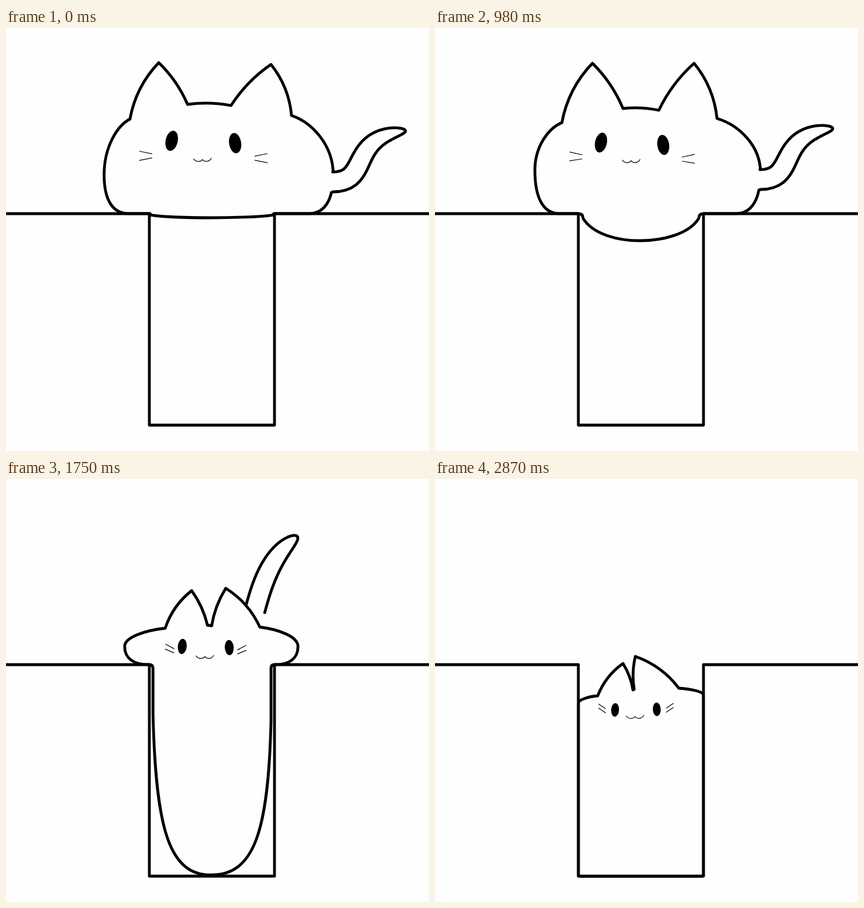
An HTML page with a canvas for the animation above (3080 ms loop, 720x720 px).

```html
<!DOCTYPE html>
<html lang="en">
<head>
<meta charset="utf-8">
<title>Cat sinking into a pit</title>
<style>
html, body { margin: 0; width: 100%; height: 100%; overflow: hidden; background: #fefefe; }
canvas { display: block; width: 100vw; height: 100vh; }
</style>
</head>
<body>
<canvas id="stage" width="720" height="720"></canvas>
<script>
const ctx = document.getElementById('stage').getContext('2d');
const LOOP = 3080, STEP = 70, LAST = 2870, TAIL_LIFTS = 1190;
const PAPER = '#fefefe', INK = '#000';
const FLOOR = 316, PIT = { left: 244, right: 457, bottom: 676, middle: 349 };

// Tail spines: cubic curves relative to the widest point of the right flank
const lying = [-1, 12, 65, 12, 23, -64, 123, -75];
const raised = [-73, -62, -61, -107, -45, -157, -1, -187];
const hidden = [-38, 70, -38, 60, -38, 50, -38, 40];

// ears: base, tip, inner base, then the same mirrored
// body: widest point on the left, on the right, lowest y
const resting = {
  t: 0, ease: 2.6, tail: lying,
  ears: [211, 155, 260, 59, 309, 130, 383, 132, 451, 62, 486, 149],
  body: [167, 250, 557, 250, 323],
  eyes: [282, 192, 390, 196],
};
const sagging = {
  t: 980, ease: 1, tail: lying,
  ears: [216, 161, 268, 60, 320, 137, 381, 140, 441, 60, 480, 154],
  body: [170, 242, 554, 246, 362],
  eyes: [282.5, 195, 388.5, 199],
};
const slipping = { ...sagging, t: 1120, body: [...sagging.body.slice(0, 4), 389] };
const pouring = {
  t: 1540, ease: 1, tail: raised,
  ears: [265, 205, 318, 136, 345, 201, 355, 202, 381, 134, 447, 208],
  body: [190, 272, 535, 272, 544],
  eyes: [296, 236, 379, 237.5],
};
const landing = {
  t: 1750, ease: 1, tail: raised,
  ears: [271, 254, 316, 190, 343, 249, 350, 250, 374, 186, 432, 252],
  body: [202, 285, 497, 285, 674],
  eyes: [300, 285, 380, 287],
};
const filling = {
  t: 2030, ease: 1, tail: hidden,
  ears: [279, 320, 311, 259, 340, 313, 343, 313, 364, 253, 413, 307],
  body: [246, 342, 455, 334, 675],
  eyes: [305, 351, 382, 352],
};
const settling = {
  t: 2310, ease: 1, tail: hidden,
  ears: [274, 363, 311, 307, 335, 356, 340, 355, 351, 296, 412, 349],
  body: [245, 380, 455, 372, 678],
  eyes: [306.5, 388, 377.5, 387],
};
const still = {
  t: LAST, ease: 1, tail: hidden,
  ears: [277, 369, 320, 314, 337, 359, 339, 358, 341, 302, 415, 356],
  body: [244, 382, 457, 368, 678],
  eyes: [306.5, 393, 377.5, 392],
};
const poses = [resting, sagging, slipping, pouring, landing, filling, settling, still];

const lerp = (a, b, u) => a + (b - a) * u;
const clamp = v => Math.max(0, Math.min(1, v));

function poseAt(t) {
  const next = Math.max(1, poses.findIndex(p => p.t >= t));
  const a = poses[next - 1], b = poses[next];
  const u = ((t - a.t) / (b.t - a.t)) ** a.ease;
  const mix = part => a[part].map((v, i) => lerp(v, b[part][i], u));
  return { ears: mix('ears'), body: mix('body'), eyes: mix('eyes'), tail: mix('tail') };
}

// Shallow arc; bow is its height relative to the chord
function arc(path, x1, y1, x2, y2, bow) {
  const k = 2 * bow;
  path.quadraticCurveTo((x1 + x2) / 2 + (y2 - y1) * k, (y1 + y2) / 2 - (x2 - x1) * k, x2, y2);
}

// Ear base, widest point, foot on the floor, rim of the pit, bottom of the belly
function addSide(path, [bx, by], [wx, wy], bottom, dir) {
  const rim = dir > 0 ? PIT.right : PIT.left;
  const overhang = Math.max(0, (wx - rim) * dir);
  const full = clamp(1 - overhang / 54);
  const floor = Math.max(FLOOR, wy);
  const edge = overhang > 0 ? rim : wx;
  const foot = edge + dir * Math.max(0, overhang - 42);

  path.bezierCurveTo(lerp(bx, wx, .5), lerp(by, wy, .12), wx, lerp(by, wy, .5), wx, wy);
  path.bezierCurveTo(wx, lerp(wy, floor, .65), lerp(foot, wx, .65), floor, foot, floor);
  path.lineTo(edge, floor);

  const depth = bottom - floor, steep = Math.min(1, depth / 228);
  const round = Math.min(8, depth / 3) * (1 - full);
  const x = edge - dir * round;
  const drop = lerp(depth - round, 4, full);
  const inset = (20 - 14 * steep) * (1 - full);
  const spread = lerp(30 + 32 * steep, Math.abs(x - PIT.middle), full);
  path.quadraticCurveTo(x, floor, x, floor + round);
  path.lineTo(x, bottom - drop);
  path.bezierCurveTo(x - dir * inset, bottom - .27 * drop,
    PIT.middle + dir * spread, bottom, PIT.middle, bottom);
}

function paint(path) {
  ctx.fillStyle = PAPER;
  ctx.fill(path);
  ctx.lineWidth = 4.8;
  ctx.stroke(path);
}

function drawBody({ ears, body }) {
  const [lx, ly, rx, ry, bottom] = body;
  const leftBase = ears.slice(0, 2), rightBase = ears.slice(10);
  const path = new Path2D();
  path.moveTo(...leftBase);
  [.075, .05, .04, .05, .075].forEach((bow, i) => arc(path, ...ears.slice(2 * i, 2 * i + 4), bow));
  addSide(path, rightBase, [rx, ry], bottom, 1);
  path.moveTo(...leftBase);
  addSide(path, leftBase, [lx, ly], bottom, -1);
  paint(path);
}

function drawTail({ tail, body }, inFront) {
  const [x0, y0, x1, y1, x2, y2, x3, y3] = tail.map((v, i) => v + body[2 + i % 2]);
  const bezier = (a, b, c, d, u, v = 1 - u) => a * v ** 3 + 3 * b * v * v * u + 3 * c * v * u * u + d * u ** 3;
  const slope = (a, b, c, d, u, v = 1 - u) => (b - a) * v * v + 2 * (c - b) * v * u + (d - c) * u * u;
  const near = [], far = [], n = 30;
  for (let i = 0; i <= n; i++) {
    const u = Math.sin(i / n * Math.PI / 2);
    const x = bezier(x0, x1, x2, x3, u), y = bezier(y0, y1, y2, y3, u);
    const dx = slope(x0, x1, x2, x3, u), dy = slope(y0, y1, y2, y3, u);
    const k = 17 * Math.sqrt(Math.max(0, 1 - u ** 4)) / (Math.hypot(dx, dy) || 1);
    near.push([x + dy * k, y - dx * k]);
    far.unshift([x - dy * k, y + dx * k]);
  }
  if (inFront) {
    // Open the flank where the tail joins it
    ctx.fillStyle = PAPER;
    ctx.fillRect(x0 - 5, y0 - 15, 10, 31);
  }
  const path = new Path2D();
  [...near, ...far].forEach(p => path.lineTo(...p));
  paint(path);
}

// Size, mouth and whiskers all follow from the distance between the eyes
function drawFace({ eyes }) {
  const [lx, ly, rx, ry] = eyes;
  const gap = rx - lx;
  const tilt = .22 * (gap - 60) / 48;
  ctx.fillStyle = INK;
  for (const [x, y, angle] of [[lx, ly, tilt], [rx, ry, -tilt * .7]]) {
    ctx.beginPath();
    ctx.ellipse(x, y, gap * .095, gap * .162, angle, 0, Math.PI * 2);
    ctx.fill();
  }

  ctx.lineWidth = 1.2;
  ctx.beginPath();
  const mx = (lx + rx) / 2 - 1.5, my = (ly + ry) / 2 + (gap - 48) * .49, w = 15;
  ctx.moveTo(mx - w, my - .5);
  ctx.bezierCurveTo(mx - w * .75, my + 5, mx - w * .2, my + 5, mx, my + .5);
  ctx.bezierCurveTo(mx + w * .2, my + 5, mx + w * .75, my + 5, mx + w, my - 1.5);

  const lift = (108 - gap) * .016, fan = .2 * (gap - 71) / 37, length = gap * .2;
  for (const [ex, ey, dir] of [[lx, ly, -1], [rx, ry, 1]]) {
    for (const row of [0, 1]) {
      const x = ex + dir * (12 + .7 * Math.abs(gap - 77));
      const y = ey + (gap - 71) * .65 - 2 + row * 7;
      const angle = lift + (row ? -fan : fan);
      ctx.moveTo(x, y);
      ctx.lineTo(x + dir * length * Math.cos(angle), y - length * Math.sin(angle));
    }
  }
  ctx.stroke();
}

const room = new Path2D();
room.rect(0, 0, 720, FLOOR + 2.4);
room.rect(PIT.left - 2.4, FLOOR, PIT.right - PIT.left + 4.8, PIT.bottom - FLOOR + 2.4);

const ground = new Path2D();
ground.moveTo(-5, FLOOR);
ground.lineTo(PIT.left, FLOOR);
ground.lineTo(PIT.left, PIT.bottom);
ground.lineTo(PIT.right, PIT.bottom);
ground.lineTo(PIT.right, FLOOR);
ground.lineTo(725, FLOOR);

function draw(t) {
  const pose = poseAt(t), tailInFront = t < TAIL_LIFTS;
  ctx.fillStyle = PAPER;
  ctx.fillRect(0, 0, 720, 720);
  ctx.strokeStyle = INK;
  ctx.lineCap = ctx.lineJoin = 'round';
  ctx.save();
  ctx.clip(room);
  if (!tailInFront) drawTail(pose, false);
  drawBody(pose);
  if (tailInFront) drawTail(pose, true);
  drawFace(pose);
  ctx.restore();
  ctx.lineWidth = 4.8;
  ctx.stroke(ground);
}

const start = performance.now();
function tick() {
  const t = (performance.now() - start) % LOOP;
  draw(Math.min(LAST, Math.floor(t / STEP) * STEP));
  requestAnimationFrame(tick);
}
tick();
</script>
</body>
</html>
```
